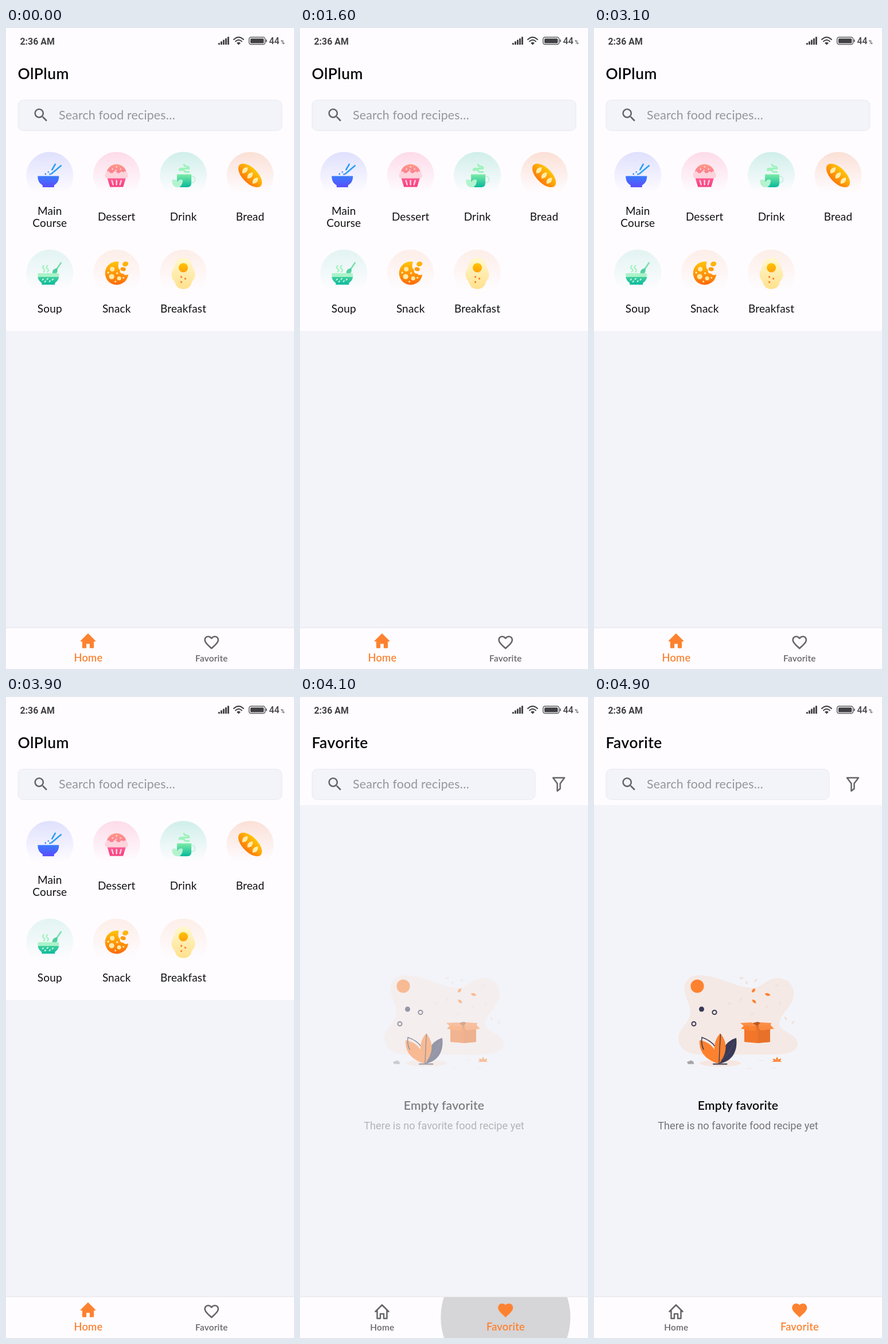
These frames come from a looping animation (502x1115 px, 5000 ms). An HTML page:

```html
<!DOCTYPE html>
<html lang="en">
<head>
<meta charset="utf-8">
<title>Recipe app</title>
<style>
  html, body { margin: 0; width: 100%; height: 100%; overflow: hidden; background: #fefcff; }
  svg { display: block; width: 502px; height: 1115px; }
  text { font-family: Lato, "Open Sans", sans-serif; }
  .sys { font-family: Roboto, Arial, sans-serif; fill: #414145; }
  .title { font-size: 26.4px; font-weight: 600; fill: #060606; letter-spacing: .5px; }
  .cat { font-size: 19px; fill: #111; text-anchor: middle; letter-spacing: .15px; }
  .hint { font-size: 21.4px; fill: #969599; letter-spacing: .15px; }
  .nav { font-weight: 600; text-anchor: middle; letter-spacing: .2px; }
  .empty { font-size: 21.2px; font-weight: 600; fill: #0b0b0c; text-anchor: middle; letter-spacing: .2px; }
</style>
</head>
<body>
<svg id="stage" viewBox="0 0 502 1115" xmlns="http://www.w3.org/2000/svg"></svg>
<script>
const LOOP = 5000, TAP = 4000, STEP = 100;
const WHITE = '#fefcff', PANEL = '#f3f4f9', ORANGE = '#fd8230', NAVY = '#393a55', GREY = '#666569';

const defs = [];
function grad(from, to, end = 1) {
  const id = 'g' + defs.length;
  defs.push(`<linearGradient id="${id}" x2="0" y2="${end}"><stop stop-color="${from}"/><stop offset="1" stop-color="${to}"/></linearGradient>`);
  return `url(#${id})`;
}
const path = (d, fill, extra = '') => `<path d="${d}" fill="${fill}" ${extra}/>`;
const line = (d, color, w, extra = '') =>
  `<path d="${d}" fill="none" stroke="${color}" stroke-width="${w}" stroke-linecap="round" stroke-linejoin="round" ${extra}/>`;
const dot = (x, y, r, fill) => `<circle cx="${x}" cy="${y}" r="${r}" fill="${fill}"/>`;
const ring = (x, y, r, color, w) => `<circle cx="${x}" cy="${y}" r="${r}" fill="none" stroke="${color}" stroke-width="${w}"/>`;
const oval = (x, y, rx, ry, fill, turn = 0) =>
  `<ellipse rx="${rx}" ry="${ry}" fill="${fill}" transform="translate(${x} ${y}) rotate(${turn})"/>`;
const rect = (x, y, w, h, fill, extra = '') => `<rect x="${x}" y="${y}" width="${w}" height="${h}" fill="${fill}" ${extra}/>`;
const text = (x, y, cls, str, extra = '') => `<text x="${x}" y="${y}" class="${cls}" ${extra}>${str}</text>`;
const leaf = (x, y, len, wide, turn, fill) =>
  path(`M${-len} 0Q0 ${-wide * 2} ${len} 0Q0 ${wide * 2} ${-len} 0Z`, fill, `transform="translate(${x} ${y}) rotate(${turn})"`);

function statusBar() {
  let s = text(24.5, 28.5, 'sys', '2:36 AM', 'font-size="15.9" font-weight="700"');
  for (let i = 0; i < 5; i++) s += rect(370 + i * 4, 26 - i * 2.7, 2.9, 3 + i * 2.7, '#414145', 'rx=".6"');
  s += line('M397 20Q405.5 12 414 20', '#414145', 2);
  s += line('M400 23.4Q405.5 18 411 23.4', '#414145', 2);
  s += path('M405.5 29.5L402 26Q405.5 23 409 26Z', '#414145');
  s += rect(423.7, 16, 28, 12.6, 'none', 'rx="3.5" stroke="#5b5b5f" stroke-width="1.5"');
  s += rect(426, 18.2, 23.4, 8.2, '#414145', 'rx="1.5"') + rect(453, 20, 1.8, 4.6, '#5b5b5f', 'rx=".8"');
  s += text(458.6, 28, 'sys', '44', 'font-size="15.8" font-weight="500"');
  return s + text(479, 28, 'sys', '%', 'font-size="9" font-weight="500"');
}

const LENS = 'M15.5 14h-.79l-.28-.27C15.41 12.59 16 11.11 16 9.5 16 5.91 13.09 3 9.5 3S3 5.91 3 9.5 5.91 16 9.5 16c1.61 0 3.09-.59 4.23-1.57l.27.28v.79l5 4.99L20.49 19zM9.5 14C7.01 14 5 11.99 5 9.5S7.01 5 9.5 5 14 7.01 14 9.5 11.99 14 9.5 14z';
const HEART = 'M12 21.35l-1.45-1.32C5.4 15.36 2 12.28 2 8.5 2 5.42 4.42 3 7.5 3c1.74 0 3.41.81 4.5 2.09C13.09 3.81 14.76 3 16.5 3 19.58 3 22 5.42 22 8.5c0 3.78-3.4 6.86-8.55 11.54z';
const HEART_GAP = 'M12 18.65C7.14 14.24 4 11.39 4 8.5 4 6.5 5.5 5 7.5 5c1.54 0 3.04.99 3.57 2.36h1.87C13.46 5.99 14.96 5 16.5 5c2 0 3.5 1.5 3.5 3.5 0 2.89-3.14 5.74-8 10.15z';

const search = w => rect(21, 125.5, w, 53, '#f2f4f9', 'rx="9" stroke="#e9eaee"') +
  path(LENS, GREY, 'transform="translate(45.6 136.2) scale(1.28)"') +
  text(92, 158.5, 'hint', 'Search food recipes…');

// Category icons, drawn around the centre of their disc
const icons = {
  main: () =>
    path('M-21 1H16C16 9 13 14 7.5 17V20.5H-12.5V17C-18 14-21 9-21 1Z', grad('#3a7cfd', '#5a4dfb')) +
    line('M4-10L9.5-19.5', '#2ba0f5', 2.6) + line('M3-3L19.5-17', '#2ba0f5', 2.6) +
    dot(-7.5, -2.5, 1.4, '#2f8ff8') + dot(-2.5, -6, 1.3, '#2f8ff8') + rect(-1, -3.4, 3, 2.4, '#2f8ff8'),
  dessert: () =>
    path('M-17-4C-17-13-9-19.5 0-19.5S17-13 17-4Z', grad('#ff9a86', '#fb7f92')) +
    path('M-17-6Q-14-9-11.5-5Q-9-1-6-5Q-3-10 0-6Q3-1 6-5Q9-9 12-5Q14-9 17-6Q21-3 20 2Q18 6 13 5H-13Q-18 6-20 2Q-21-4-17-6Z', '#fdd3dc') +
    path('M-16 5H16L11.5 20H-11.5Z', grad('#fd5a92', '#f93e80')) +
    line('M-8 9L-6 16M0 9V16M8 9L6 16', '#fdd3dc', 2.6) +
    [[-7, -11], [0, -15], [7, -11], [-1, -9]].map(p => dot(p[0], p[1], 1.3, '#fddde0')).join(''),
  drink: () =>
    ring(15, 7, 5.5, '#c3f1dc', 2) +
    path('M-11-2H14V13Q14 20.5 7 20.5H-3Q-11 20.5-11 13Z', grad('#7ceca5', '#07b89c')) +
    path('M-20 8Q-13 5-10 11Q-7 5-1 8Q-1 18-8 20.5H-13Q-20 18-20 8Z', '#b4f3cf') +
    line('M1-19Q2-15.5 6-15.5T10-12H-1Q-7-12.5-7-9.5H1Q2-6 5-6H10', '#9df3bb', 2.8),
  bread: () =>
    oval(0, 0, 26, 13.2, grad('#ffc608', '#fd7908'), 45) +
    [-9, 0, 9].map(p => leaf(p, p, 7, 3.8, -48, '#ffeda9')).join(''),
  soup: () =>
    line('M-10.5-13Q-14-10-10.5-7.5T-10.5-2.5M-4-13Q-7.5-10-4-7.5T-4-2.5', '#a5f2c3', 2.4) +
    line('M19.5-18L12-7', '#77dfae', 2.6) + leaf(9, -3, 7, 4, -55, '#52cfa2') +
    rect(-21, 0, 37, 6.5, '#a9f3c8', 'rx="2"') +
    path('M-21 6.5H16Q15 13 9 17V20H-14V17Q-20 13-21 6.5Z', grad('#43cfa0', '#0bb99d')) +
    [[-12, 11], [-4, 10], [5, 11], [-8, 14.5], [0, 14]].map(p => leaf(p[0], p[1], 2.4, 1.2, -50, '#c9f7dc')).join(''),
  snack: () =>
    path('M4-20A20.3 20.3 0 1 0 20.5 2Q15 5 12 1Q5 1 6-6Q1-9 4-20Z', grad('#ffc50a', '#fd6a0a')) +
    oval(15.5, -16, 5.2, 4.2, '#fdb40c', -20) + oval(11.5, -7, 4.6, 3.3, '#fd9b0c', 10) +
    [[-7.5, -7, 4], [-8.5, 6, 4.6], [4.5, 9, 3.6], [-14.5, -1, 1.8], [1, 0, 1.7], [-2, 14.5, 1.5], [12, 8, 1.6]]
      .map(p => dot(...p, '#ffeaa5')).join(''),
  breakfast: () =>
    path('M0-27C10-27 14-21 15.5-13C17-7 20.5-4 20.5 3C20.5 10 15.5 12 14 18C12 25 6 27.5 0 27.5S-12 25-14 18C-15.5 12-20.5 10-20.5 3C-20.5-4-17-7-15.5-13C-14-21-10-27 0-27Z', grad('#fff8cf', '#ffe18e')) +
    dot(0, -9.5, 8, grad('#ffc404', '#fda00a')) +
    dot(-3.5, 6.5, 1.7, '#fd7f28') + dot(3.5, 9.5, 1.7, '#fd7f28') + dot(-3.5, 15.5, 1.7, '#fd7f28'),
};

const cats = [
  ['main', '#dfe0fd', 'Main', 'Course'], ['dessert', '#fddbe9', 'Dessert'], ['drink', '#d0efea', 'Drink'],
  ['bread', '#fbe0d6', 'Bread'], ['soup', '#e2f4f2', 'Soup'], ['snack', '#fdeee8', 'Snack'], ['breakfast', '#fdeee8', 'Breakfast'],
];

function category([icon, tint, ...words], i) {
  const x = 76.3 + (i % 4) * 116.4, y = i < 4 ? 256.5 : 426.5;
  const base = i < 4 ? 335 : 494.5;
  return dot(x, y, 41, grad(tint, WHITE, 0.86)) +
    `<g transform="translate(${x} ${y})">${icons[icon]()}</g>` +
    words.map((w, k) => text(x, base + (words.length > 1 ? k * 21.5 - 10.5 : 0), 'cat', w)).join('');
}

const homePage = () => rect(0, 527, 502, 516, PANEL) +
  text(20.5, 89, 'title', 'OlPlum') + search(460) + cats.map(category).join('');

function artwork() {
  let s = path('M158 512C156 496 164 484 184 484C216 484 246 505 276 506C292 506 300 490 320 489C340 489 350 504 348 520C345 540 322 554 323 569C325 585 356 584 355 605C353 622 322 623 292 622C250 622 217 622 186 622C161 621 147 610 147 594C148 574 168 567 168 547C168 534 160 526 158 512Z', '#f5e9e5');
  s += dot(180, 503, 11.6, ORANGE) + dot(187.5, 543, 4.5, NAVY) + ring(210, 548.5, 3.6, NAVY, 2) + ring(174, 568.5, 3.5, NAVY, 2);
  s += oval(220, 637, 36, 6, '#f6e6df') + oval(292, 632, 6, .8, '#f2e6e2') + oval(271, 646, 6, .8, '#f2e6e2') + oval(313, 645, 6, .8, '#f2e6e2');
  const pale = [[257, 489], [266, 497], [282, 493], [236, 533], [256, 526], [276, 551], [301, 539], [324, 533], [319, 502], [334, 559], [347, 566]];
  s += pale.map(([x, y], i) => leaf(x, y, 4, 1.9, i * 67, '#f1e1dd')).join('');
  s += leaf(278, 510.5, 4.6, 2.4, -50, ORANGE) + leaf(302.5, 517.5, 5, 2.3, 14, ORANGE) + leaf(279, 529.5, 4.8, 2.3, 42, ORANGE);
  // plant
  s += path('M218 638C189 630 183 612 184 597C205 600 217 618 218 638Z', ORANGE);
  s += line('M218 636C216 612 211 600 188 592C187 600 188 607 191 613', NAVY, 1.6);
  s += path('M218 638C223 612 229 599 248 593C251 616 241 634 218 638Z', NAVY);
  s += path('M218 638C206 615 208 599 220 585C233 600 233 619 218 638Z', ORANGE);
  s += line('M218 637Q219 610 220.5 587', NAVY, 1.4) + line('M208 638.5H231.5', NAVY, 2);
  s += line('M221 632Q236 622 244 601', '#585975', .7);
  // box
  s += path('M262 570L285 574L307 570V600L285 602L262 600Z', '#f2762a') + path('M285 574L307 570V600L285 602Z', '#e87129');
  s += path('M262 571L285 565L307 571L285 576Z', '#bd5a22');
  s += path('M255 567L275 566L285 573L262 573Z', '#fb8e48') + path('M290 566L309 567L307 573L285 573Z', '#fb8e48');
  s += path('M262 571L285 574L279 581L256 577Z', ORANGE) + path('M285 574L307 570L314 577L291 580Z', '#fb8a40');
  // ground details
  s += path('M162 635L169 632L173 634L174.5 638.5H164Z', '#a7a5a8');
  s += leaf(315, 631.5, 4, 1.8, 35, ORANGE) + leaf(319, 630, 4, 1.8, 90, ORANGE) + leaf(323, 631.5, 4, 1.8, -35, ORANGE) + line('M311.5 633.8H326', ORANGE, 1.4);
  return s;
}

const favoritePage = () => rect(0, 188, 502, 855, PANEL) +
  text(20.5, 89, 'title', 'Favorite') + search(389) +
  line('M441 140.5H461L453.5 150.5V159.5L448.5 163.5V150.5Z', GREY, 2.5) +
  `<g id="empty">${artwork()}` +
  text(251, 717.5, 'empty', 'Empty favorite') +
  text(251, 752, 'sys', 'There is no favorite food recipe yet', 'font-size="18.2" style="fill:#757478" text-anchor="middle"') + '</g>';

const navBar = () => rect(0, 1043, 502, 72, WHITE) + rect(0, 1042.5, 502, 1.5, '#ebebee') +
  `<clipPath id="bar"><rect y="1044" width="502" height="71"/></clipPath><circle id="ripple" cx="358.3" cy="1079" clip-path="url(#bar)"/>` +
  `<g id="homeOn">${path('M143 1054L155.5 1066.5H152.3V1078H146.7V1070.5H139.3V1078H133.7V1066.5H130.5Z', ORANGE, `stroke="${ORANGE}" stroke-width="1.6" stroke-linejoin="round"`)}</g>` +
  `<g id="homeOff">${line('M131.5 1069L143 1057.5L154.5 1069M134.5 1067V1081H140V1073H146V1081H151.5V1067', GREY, 2.5)}</g>` +
  `<g id="favOn">${path(HEART, ORANGE, 'transform="translate(342.7 1051.2) scale(1.3)"')}</g>` +
  `<g id="favOff">${path(HEART + HEART_GAP, GREY, 'fill-rule="evenodd" transform="translate(342.8 1053.3) scale(1.29)"')}</g>` +
  text(143.4, 1102, 'nav', 'Home', 'id="homeTab"') + text(358.4, 1102, 'nav', 'Favorite', 'id="favTab"');

const body = statusBar() + `<g id="home">${homePage()}</g><g id="favorite">${favoritePage()}</g>` + navBar();
const stage = document.getElementById('stage');
stage.innerHTML = `<defs>${defs.join('')}</defs>${rect(0, 0, 502, 1115, WHITE)}${body}`;

const el = id => document.getElementById(id);
const show = (id, on) => el(id).setAttribute('display', on ? 'inline' : 'none');
const clamp = v => Math.max(0, Math.min(1, v));
const mix = (a, b, p) => a + (b - a) * p;

function styleTab(id, p) {
  const rgb = [102, 101, 105].map((c, i) => Math.round(mix(c, [253, 130, 48][i], p)));
  el(id).setAttribute('font-size', mix(15.4, 18.3, p));
  el(id).setAttribute('fill', `rgb(${rgb})`);
}

function update(ms) {
  const t = Math.floor((ms % LOOP) / STEP) * STEP;
  const fav = t >= TAP;
  const picked = fav ? clamp((t - TAP + 100) / 200) : 0;
  show('home', !fav);
  show('favorite', fav);
  show('homeOn', !fav);
  show('homeOff', fav);
  show('favOn', fav);
  show('favOff', !fav);
  styleTab('homeTab', 1 - picked);
  styleTab('favTab', picked);
  el('empty').setAttribute('opacity', clamp((t - TAP + 50) / 300));
  el('ripple').setAttribute('r', fav ? 113 * Math.sin(picked * Math.PI / 2) : 0);
  el('ripple').setAttribute('fill-opacity', fav ? 0.157 * clamp((TAP + 250 - t) / 150) : 0);
}

const start = performance.now();
function tick() {
  update(performance.now() - start);
  requestAnimationFrame(tick);
}
update(0);
requestAnimationFrame(tick);
</script>
</body>
</html>
```
